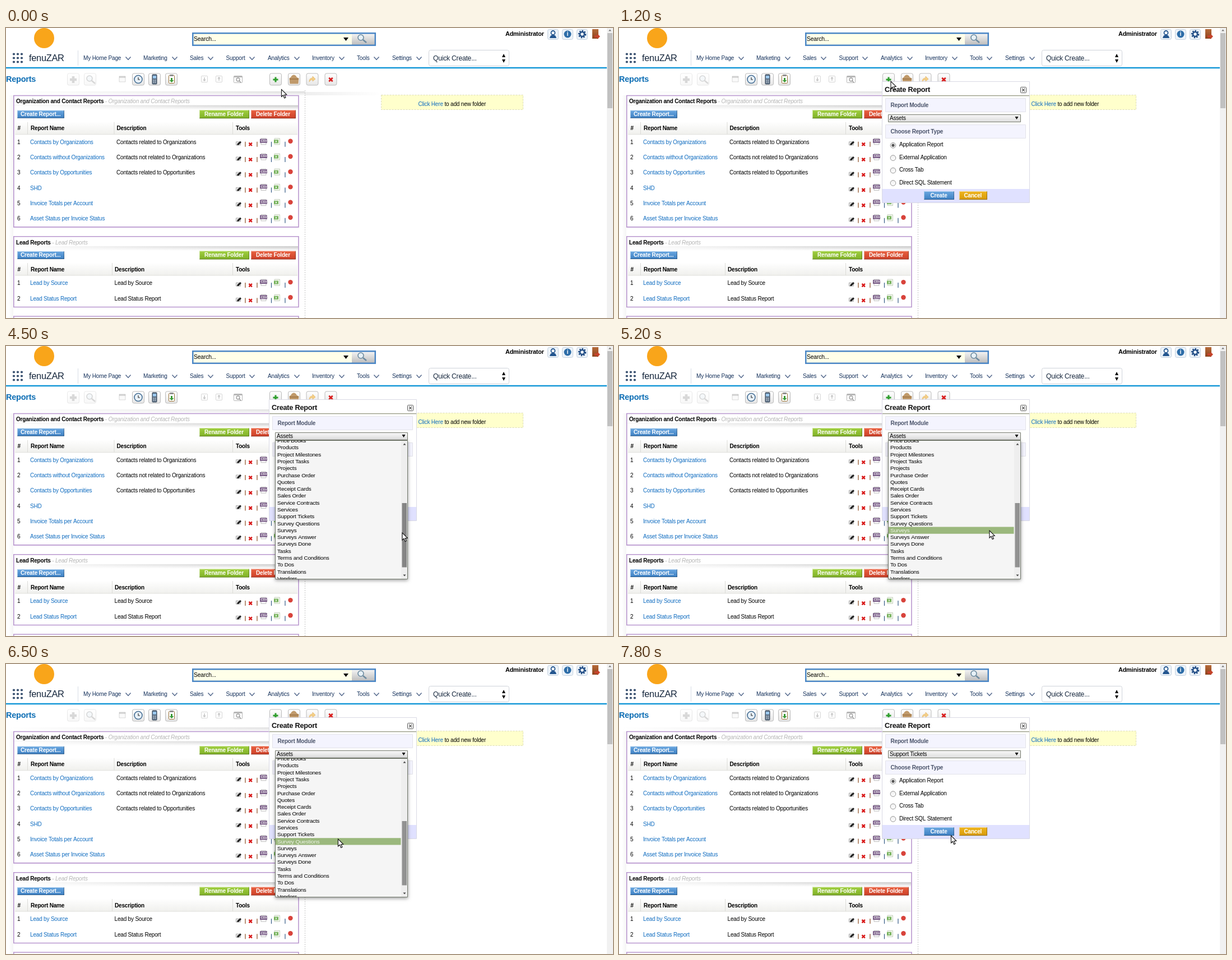
An HTML page with a canvas for the animation above (8000 ms loop, 1083 px wide and 517 px high).

```html
<!DOCTYPE html>
<html lang="en">
<head>
<meta charset="utf-8">
<title>Create Report</title>
<style>
html, body { margin: 0; width: 100%; height: 100%; overflow: hidden; background: #fff; }
canvas { display: block; }
</style>
</head>
<body>
<canvas id="stage" width="1083" height="517"></canvas>
<script>
const ctx = document.getElementById('stage').getContext('2d');
const LINK = '#0f6cc0', LOOP = 8000;

// Slightly tall, tightly set type, like hinted screen text.
function text(s, x, y, color = '#000', size = 9.65, style = '') {
  ctx.font = `${style} ${size * 1.04}px "Liberation Sans", Arial, sans-serif`;
  ctx.letterSpacing = -size * 0.02 + 'px';
  ctx.fillStyle = color;
  ctx.fillText(s, x, y + size * 0.34);
}
const bold = (s, x, y, color, size) => text(s, x, y, color, size, 'bold');

function rect(x, y, w, h, fill, stroke, radius = 0) {
  ctx.beginPath();
  ctx.roundRect(x, y, w, h, radius);
  if (fill) { ctx.fillStyle = fill; ctx.fill(); }
  if (stroke) { ctx.strokeStyle = stroke; ctx.lineWidth = 1; ctx.stroke(); }
}
function fade(x0, y0, x1, y1, from, to) {
  const g = ctx.createLinearGradient(x0, y0, x1, y1);
  g.addColorStop(0, from);
  g.addColorStop(1, to);
  return g;
}
const vertical = (y, h, from, to) => fade(0, y, 0, y + h, from, to);

function shape(d, x, y, fill, stroke, width = 1) {
  ctx.save();
  ctx.translate(x, y);
  const p = new Path2D(d);
  if (fill) { ctx.fillStyle = fill; ctx.fill(p); }
  if (stroke) { ctx.strokeStyle = stroke; ctx.lineWidth = width; ctx.stroke(p); }
  ctx.restore();
}
function disc(x, y, r, fill, stroke, width = 1) {
  ctx.beginPath();
  ctx.arc(x, y, r, 0, 7);
  if (fill) { ctx.fillStyle = fill; ctx.fill(); }
  if (stroke) { ctx.strokeStyle = stroke; ctx.lineWidth = width; ctx.stroke(); }
}
const triangle = (x, y, w, h, color = '#000') =>
  shape(`M${-w / 2} ${-h / 2}H${w / 2}L0 ${h / 2}Z`, x, y, color);
const cross = (x, y, r, color, width) =>
  shape(`M${-r} ${-r}L${r} ${r}M${r} ${-r}L${-r} ${r}`, x, y, null, color, width);
const plus = (x, y, r, color, width) =>
  shape(`M${-r} 0H${r}M0 ${-r}V${r}`, x, y, null, color, width);

function button(s, x, y, w, h, textX, from, to) {
  rect(x, y, w, h, vertical(y, h, from, to));
  shape(`M.5 ${h}V.5H${w}`, x, y, null, 'rgba(255,255,255,.45)');
  shape(`M0 ${h - .5}H${w - .5}V0`, x, y, null, 'rgba(0,0,0,.3)');
  bold(s, textX, y + h / 2, '#fff');
}

function lens(x, y, color) {
  disc(x - 1, y - 2, 5, '#e6f0f6', color, 1.6);
  shape('M0 0L6 5', x + 3, y + 2, null, color, 2.5);
}

function header() {
  disc(68, 18, 18, '#f9a51a');
  rect(333.5, 9.5, 325, 21, '#ffffe9');
  rect(617, 10, 41, 20, vertical(10, 20, '#f4f4f4', '#bdbdbd'));
  ctx.strokeStyle = '#4a86c5';
  ctx.lineWidth = 2.5;
  ctx.strokeRect(333.3, 9.3, 325.5, 21.5);
  text('Search...', 335, 20, '#000', 10);
  triangle(606.5, 20, 9, 6);
  lens(634, 19, '#6c8ba0');

  bold('Administrator', 891, 10, '#000', 10.5);
  for (const x of [966, 992, 1018]) rect(x + .5, 2.5, 19, 18, '#edf3f9', '#c3d1df', 3);
  disc(976, 8.5, 3.5, '#fff', '#24568f', 1.8);
  shape('M-6 6Q-5 0 0 0Q5 0 6 6Z', 976, 12, '#24568f');
  disc(1002, 11, 6.5, '#2d6da8');
  bold('i', 1000.6, 11, '#fff', 10);
  ctx.setLineDash([2.5, 2]);
  disc(1028, 11, 6, null, '#244f87', 2.5);
  ctx.setLineDash([]);
  disc(1028, 11, 4, null, '#244f87', 2.6);
  rect(1046, 2, 11, 17, vertical(2, 17, '#b66b3a', '#8d431d'));
  shape('M0 3H5V0L10 5L5 10V7H0Z', 1050, 10, '#c5432b');

  for (let i = 0; i < 9; i++) disc(14 + i % 3 * 7, 46.5 + (i / 3 | 0) * 7, 2.1, '#38506f');
  text('fenuZAR', 41, 54, '#16273d', 15.8);
  rect(128, 40, 1, 27, '#d8dde6');
  const menu = [['My Home Page', 138, 218], ['Marketing', 245, 301], ['Sales', 328, 365], ['Support', 392.5, 439],
    ['Analytics', 467, 519], ['Inventory', 546, 599], ['Tools', 626, 661], ['Settings', 689, 737]];
  for (const [label, x, arrow] of menu) {
    text(label, x, 54, '#16325c', 9.72);
    shape('M-4.5 -2.5L0 2.5L4.5 -2.5', arrow, 54, null, '#54698d', 1.5);
  }
  rect(754.5, 39.5, 143, 28, '#fff', '#cfd3da', 3);
  text('Quick Create...', 762, 54, '#16273d', 11.7);
  triangle(888, 49, 6, -6);
  triangle(888, 59, 6, 6);
  rect(0, 69.7, 1072, 2.6, '#1598d8');
}

function toolbar() {
  const tile = x => rect(x - 10.5, 81, 21, 21, vertical(81, 21, '#fff', '#e6e6e6'), '#bbb', 3);
  bold('Reports', 0, 91, '#0f6fb5', 14);
  ctx.globalAlpha = .3;
  for (const x of [120, 150]) tile(x);
  plus(120, 92, 6, '#888', 4.5);
  lens(150, 92, '#888');
  rect(202, 86, 11, 10, '#eee', '#888');
  rect(202, 86, 11, 3, '#888');
  for (const x of [354, 380]) rect(x - 5.5, 85.5, 11, 11, '#fff', '#777', 1);
  shape('M0 -3V3M-2 1L0 3L2 1', 354, 91, null, '#333', 1.4);
  shape('M0 3V-3M-2 -1L0 -3L2 -1', 380, 91, null, '#333', 1.4);
  ctx.globalAlpha = .6;
  rect(406.5, 85.5, 15, 12, '#fff', '#888', 1);
  rect(407, 86, 14, 2, '#888');
  disc(414, 92, 3, '#eee', '#666', 1.3);
  shape('M0 0L3 3', 416, 94, null, '#666', 1.6);
  ctx.globalAlpha = 1;

  for (const x of [236, 265, 295, 481, 514, 546.5, 579.5]) tile(x);
  disc(236, 91.5, 7, '#e8f1f8', '#466f95', 1.6);
  shape('M0 -4V0H3', 236, 92, null, '#333', 1.2);
  rect(261, 83, 8, 17, '#52677d', '#3a4a5c', 1);
  rect(262, 85, 6, 5, '#9cc9ee');
  for (let i = 0; i < 6; i++) rect(262.3 + i % 2 * 3.2, 92 + (i >> 1) * 2.4, 2, 1.3, '#dce3ea');
  rect(290.5, 84.5, 10, 14, '#fff', '#9a7238', 1);
  rect(292.5, 83, 6, 3, '#8d8d8d');
  shape('M-1.5 -4H1.5V0H4L0 4L-4 0H-1.5Z', 295.5, 93, '#3b9a36');
  plus(481, 92, 4.5, '#2f9e2d', 3);
  shape('M0 6Q3 5 4 2Q8 -2 12 2Q13 5 17 6L16 16H1Z', 505.5, 83.5, '#c09a6b');
  rect(506, 90, 16, 2, '#a67c4b');
  shape('M-5 5Q-5 -2 1 -2V-5L6 0L1 4V1Q-3 1 -5 5Z', 546, 91, '#f5cf86', '#e0ad58', .6);
  cross(579.5, 92, 3.2, '#d91e1e', 2.8);
}

function tools(y) {
  rect(410.5, y - 1, 8, 6, '#e9e9e9', '#aaa');
  shape('M0 4L1 1L6 -3L8 -1L3 4Z', 412, y + 1, '#222');
  [427, 448, 473.5, 498].forEach((x, i) => rect(x - .6, y - 1, 1.2, 9, i < 2 ? '#8a4b20' : '#345a86'));
  cross(436.2, y + 3.5, 2.7, '#d81313', 2.4);
  rect(455, y - 7, 9, 11, '#fff', '#bbb');
  rect(453, y - 6, 13, 7, '#775a85');
  bold('CSV', 454.4, y - 2.5, '#fff', 5.4);
  rect(479, y - 7, 9.5, 11, '#f2f7ee', '#c5d1bd');
  rect(478, y - 4.5, 8, 6, '#72b057');
  cross(482, y - 1.5, 1.6, '#fff', 1);
  disc(507.5, y - 2, 4.2, '#d8433b');
}

function shadowBand(x, y, w, h, tone) {
  rect(x, y, w, h, vertical(y, h, tone, '#fff'));
  rect(x, y, w, h, fade(x, 0, x + w, 0, '#fff', 'rgba(255,255,255,0)'));
}

function folder(name, y, h, split, rows) {
  rect(13, y, 509.8, h, '#b997cf');
  rect(14.6, y + 1.6, 506.6, h - 3.2, '#fff');
  shadowBand(15, y + 18, 506, 8, '#c8c8c8');
  bold(name, 18, y + 11.3);
  text('- ' + name, 18 + ctx.measureText(name).width + 2.5, y + 11.3, '#b5b5b5', 9.65, 'italic');
  button('Create Report...', 20, y + 27, 84, 14, 26, '#6aa7e0', '#3c7fc2');
  button('Rename Folder', 345, y + 26.5, 89, 15, 354, '#a0cf3f', '#7fb027');
  button('Delete Folder', 437, y + 26.5, 80, 15, 446, '#e9603f', '#cc4029');
  rect(16, y + 47, 504, 23, vertical(y + 47, 23, '#fff', '#f0f0ed'));
  rect(16, y + 69.5, 504, 1, '#e0e0dc');
  for (const x of [38, split - 5, 404]) rect(x, y + 48, 1, 22, '#dcdcd8');
  [['#', 20.5], ['Report Name', 44], ['Description', split], ['Tools', 410]]
    .forEach(([label, x]) => bold(label, x, y + 59.5));
  rows.forEach(([report, about], i) => {
    const rowY = y + 84.1 + i * 27.2;
    text(i + 1, 20, rowY);
    text(report, 43, rowY, LINK);
    text(about, split - .5, rowY);
    tools(rowY);
  });
}

function page() {
  rect(0, 0, 1083, 517, '#fff');
  header();
  toolbar();
  shadowBand(5, 113, 528, 8, '#dcdcdc');
  rect(533, 114, 137, 6, fade(533, 0, 670, 0, '#eee', '#fff'));
  rect(5, 120, 8, 397, fade(5, 0, 13, 0, '#fff', '#f5f5f5'));
  ctx.setLineDash([2, 2]);
  shape('M0 0V406', 533.5, 111, null, '#c4c4c4');
  ctx.setLineDash([]);
  folder('Organization and Contact Reports', 119.7, 236, 197.5, [
    ['Contacts by Organizations', 'Contacts related to Organizations'],
    ['Contacts without Organizations', 'Contacts not related to Organizations'],
    ['Contacts by Opportunities', 'Contacts related to Opportunities'],
    ['SHD', ''], ['Invoice Totals per Account', ''], ['Asset Status per Invoice Status', '']]);
  folder('Lead Reports', 371, 127.3, 194, [
    ['Lead by Source', 'Lead by Source'], ['Lead Status Report', 'Lead Status Report']]);
  rect(13, 513.2, 509.8, 4, '#b997cf');
  rect(14.6, 514.8, 506.6, 3, '#fff');

  rect(670, 119.5, 253, 26, '#ffffcc');
  ctx.setLineDash([3, 2]);
  rect(669.5, 119.5, 253, 26, null, '#dcdcb8');
  ctx.setLineDash([]);
  text('Click Here', 735.5, 136, LINK);
  text('to add new folder', 782.5, 136);

  rect(1072, 0, 11, 517, '#f1f1f1');
  rect(1073, 9, 9, 134, '#c1c1c1');
  triangle(1077.5, 4, 5, -3, '#777');
}

function dialog(choice) {
  rect(469.5, 95.5, 263, 216, '#fff', '#d9d9e4');
  bold('Create Report', 474, 110.3, '#111', 12.25);
  rect(716.5, 105.5, 10, 10, '#fff', '#555', 1);
  cross(721.5, 110.5, 2.6, '#444', 1.2);
  rect(470, 120, 262, 1.2, '#93967f');
  for (const [label, y] of [['Report Module', 125.5], ['Choose Report Type', 172.5]]) {
    rect(475.5, y, 250, 24, '#f4f4fe', '#e3e3ea');
    bold(label, 484.5, y + 12, '#4c556b');
  }
  rect(480.5, 154.5, 236, 13, vertical(154, 13, '#f8f8f8', '#dedede'), '#75796d');
  text(choice, 483, 161);
  triangle(709.5, 160.5, 6, 5);
  ['Application Report', 'External Application', 'Cross Tab', 'Direct SQL Statement'].forEach((label, i) => {
    const y = 208.2 + i * 22.4;
    disc(489, y + 1, 4.8, vertical(y - 4, 10, '#eee', '#fff'), '#949494');
    if (!i) disc(489, y + 1, 2.6, '#555');
    text(label, 500, y);
  });
  rect(470, 287, 262, 24, '#e0e1ff');
  button('Create', 544, 291, 54, 15, 555.5, '#6aa7e0', '#3c7fc2');
  button('Cancel', 607, 291, 50, 15, 615.5, '#efb51f', '#d79a06');
}

const modules = ['Price Books', 'Products', 'Project Milestones', 'Project Tasks', 'Projects', 'Purchase Order',
  'Quotes', 'Receipt Cards', 'Sales Order', 'Service Contracts', 'Services', 'Support Tickets',
  'Survey Questions', 'Surveys', 'Surveys Answer', 'Surveys Done', 'Tasks', 'Terms and Conditions',
  'To Dos', 'Translations', 'Vendors'];

function dropdown(selected, thumb) {
  ctx.save();
  ctx.shadowColor = 'rgba(0,0,0,.4)';
  ctx.shadowBlur = 6;
  ctx.shadowOffsetY = 2;
  rect(480, 168, 237, 248, '#f5f5f5');
  ctx.restore();
  ctx.save();
  rect(480.5, 168.5, 236, 247, '#f5f5f5', '#70776a');
  ctx.clip();
  modules.forEach((name, i) => {
    const y = 168.8 + i * 12.29, on = name === selected;
    if (on) rect(481, y - 6.1, 223.5, 12.3, '#9bb87d');
    text(name, 484, y, on ? '#f0f5ea' : '#000', 9.6);
  });
  rect(705, 169, 11, 246, '#eeeeee');
  rect(706.5, 280, 8.5, 114.5, thumb);
  triangle(711, 175, 5, -3, '#444');
  triangle(711, 409, 5, 3, '#444');
  ctx.restore();
}

const arrow = (x, y) =>
  shape('M0 0V13L3 10.3L5.2 15.5L7.5 14.5L5.3 9.7L9.3 9.4Z', x, y, '#fff', '#111', 1.1);
const hand = (x, y) =>
  shape('M-1.3 6V1Q0 -1 1.3 1V4L6 5.2V9L4.5 13H-2L-5 8.5Q-5.4 6.5 -3.4 7L-1.3 8.5Z', x, y, '#fff', '#111', 1.1);

// time, x, y of the pointer
const track = [[0, 491.5, 109.5], [300, 490, 107], [400, 489, 104], [500, 487, 100], [600, 486, 97], [700, 485, 95],
  [1700, 488, 103], [1800, 496, 119], [1900, 504, 137], [2000, 510, 151], [2100, 513.5, 158],
  [4500, 707, 333], [5200, 661, 329], [5500, 608, 332], [5700, 602.5, 344],
  [6500, 592.5, 312], [6800, 592.5, 309], [7000, 592.5, 306]];
const hovers = [[5200, 'Surveys'], [5700, 'Surveys Answer'], [6500, 'Survey Questions'], [7000, 'Support Tickets']];
const latest = (list, t) => list.findLast(([start]) => start <= t);

function draw(t) {
  page();
  if (t >= 1200) dialog(t >= 7800 ? 'Support Tickets' : 'Assets');
  if (t >= 4500 && t < 7800) dropdown(latest(hovers, t)?.[1], t < 5200 ? '#858585' : '#929292');
  const [, x, y] = latest(track, t);
  (t >= 500 && t < 1200 ? hand : arrow)(x, y);
}

function tick(now) {
  draw(now % LOOP);
  requestAnimationFrame(tick);
}
draw(0);
requestAnimationFrame(tick);
</script>
</body>
</html>
```
